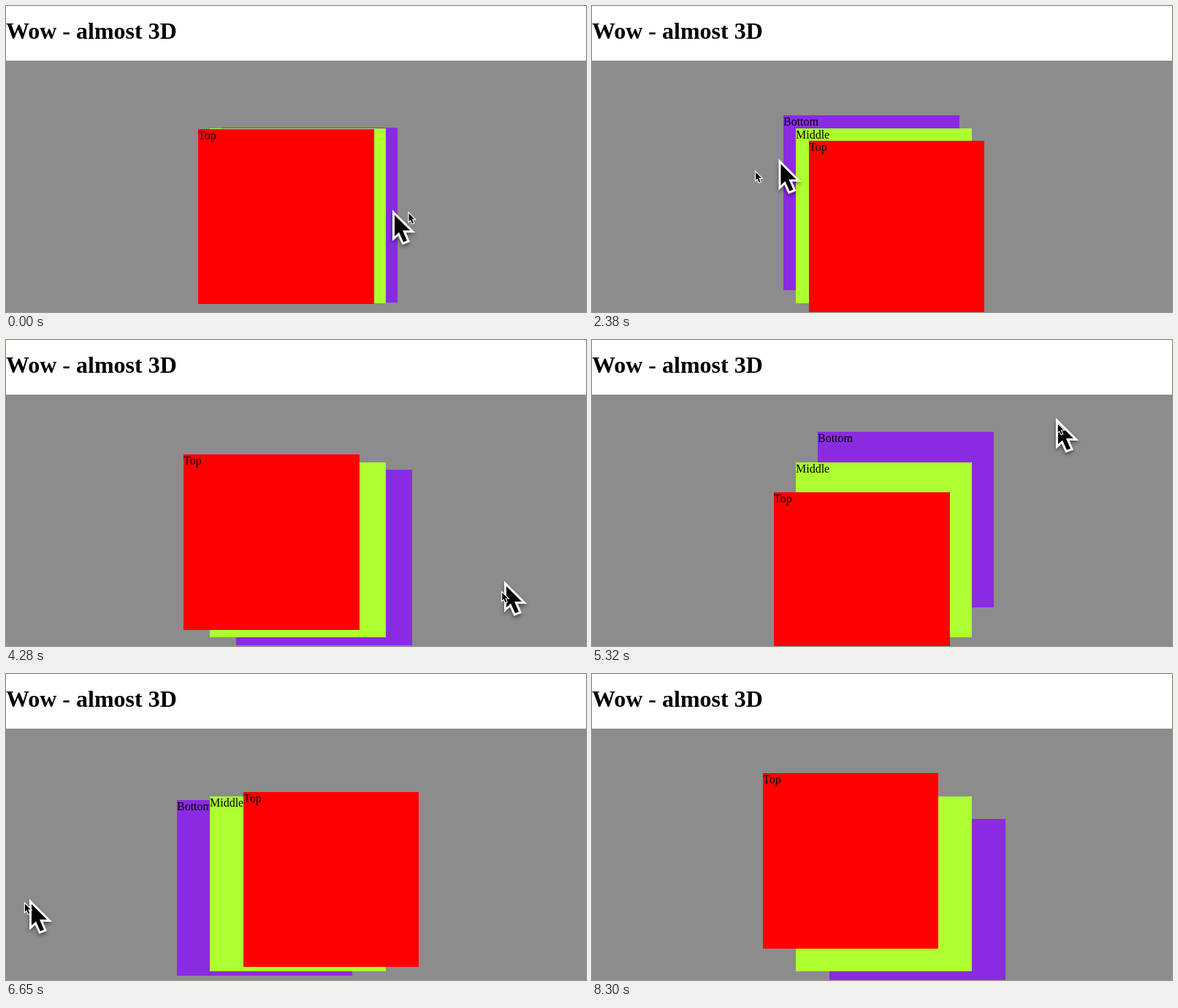
These frames come from a looping animation (794 px wide and 420 px high, 9.26 s). An HTML page with a canvas:

```html
<!DOCTYPE html>
<html lang="en">
<head>
<meta charset="utf-8">
<title>Almost 3D</title>
<style>
html, body { margin: 0; width: 100%; height: 100%; overflow: hidden; background: #fff; }
canvas { display: block; }
</style>
</head>
<body>
<canvas id="stage" width="794" height="420"></canvas>
<script>
const ctx = document.getElementById('stage').getContext('2d');
const LOOP = 9260;
const TICK = 147.5;
const LAST = 56;
const SIZE = 240.4;
const SERIF = '"Liberation Serif", serif';

// Turning points of the pointer: tick, x, y, and ticks to rest there
const turns = [
  [-1, 430, 288], [0, 530, 281], [1.9, 627, 274, 1.5], [6, 713, 310],
  [9, 607, 246], [11.9, 440, 146, 1.5], [19, 29, 304], [21, 212, 314],
  [22, 374, 317], [25.9, 692, 308, 1.5], [29, 683, 332], [31, 640, 410],
  [36, 636, 108], [40, 700, 285], [43, 652, 315], [45, 33, 310],
  [47, 4, 314], [51.9, 762, 302, 1.5], [LAST, 762, 421]
];
const path = turns.flatMap(([k, x, y, rest]) =>
  rest ? [[k, x, y], [k + rest, x, y]] : [[k, x, y]]);

const slope = (i, c) => (path[i + 1][c] - path[i][c]) / (path[i + 1][0] - path[i][0]);

// Monotone tangent, so the pointer never overshoots a turn or a rest
function tangent(i, c) {
  if (i === 0) return slope(0, c);
  if (i === path.length - 1) return 0;
  const a = slope(i - 1, c), b = slope(i, c);
  return a * b > 0 ? 2 * a * b / (a + b) : 0;
}

function pointer(tick) {
  const t = Math.min(tick, LAST);
  let i = 0;
  while (t > path[i + 1][0]) i++;
  const from = path[i], to = path[i + 1];
  const h = to[0] - from[0], u = (t - from[0]) / h, v = 1 - u;
  return [1, 2].map(c =>
    from[c] * v * v * (1 + 2 * u) + to[c] * u * u * (3 - 2 * u) +
    h * u * v * (v * tangent(i, c) - u * tangent(i + 1, c)));
}

function text(str, x, y, font) {
  ctx.fillStyle = '#000';
  ctx.font = font + ' ' + SERIF;
  ctx.fillText(str, x, y);
}

// Edges snap to whole pixels
function square(label, color, dx, dy) {
  const x = 279.4 + dx, y = 167.7 + dy;
  const left = Math.round(x), top = Math.round(y);
  ctx.fillStyle = color;
  ctx.fillRect(left, top, Math.round(x + SIZE) - left, Math.round(y + SIZE) - top);
  text(label, left, top + 14, '16px');
}

const arrow = [[2, 6], [2, 35], [8, 29.5], [14, 43], [19, 41], [13, 27], [23, 27]];

function cursor(x, y, scale, shadow) {
  ctx.save();
  ctx.translate(x, y);
  ctx.scale(scale, scale);
  ctx.beginPath();
  arrow.forEach(p => ctx.lineTo(p[0], p[1]));
  ctx.closePath();
  ctx.lineWidth = 6;
  ctx.strokeStyle = '#fff';
  if (shadow) {
    ctx.shadowColor = 'rgba(0,0,0,0.45)';
    ctx.shadowBlur = 5;
    ctx.shadowOffsetY = 3;
  }
  ctx.stroke();
  ctx.shadowColor = 'transparent';
  ctx.fillStyle = '#000';
  ctx.fill();
  ctx.restore();
}

function draw(ms) {
  const tick = Math.min(LAST, Math.floor(ms / TICK));
  ctx.fillStyle = '#fff';
  ctx.fillRect(0, 0, 794, 75);
  ctx.fillStyle = '#8c8c8c';
  ctx.fillRect(0, 75, 794, 345);
  text('Wow - almost 3D', 0, 45, 'bold 32px');

  // Layers trail the pointer slightly
  const [mx, my] = pointer(tick - 0.05);
  const dx = (398 - mx) / 7.95, dy = (285.5 - my) / 4.3;
  square('Bottom', '#8a2be2', -dx, -dy);
  square('Middle', '#adff2f', 0, 0);
  square('Top', '#ff0000', dx, dy);

  if (tick < LAST) {
    const [bx, by] = pointer(tick);
    const [sx, sy] = pointer(tick + 0.3);
    cursor(bx, by, 1, true);
    cursor(sx, sy + 3, 0.37, false);
  }
}

const start = performance.now();
function loop() {
  draw((performance.now() - start) % LOOP);
  requestAnimationFrame(loop);
}
loop();
</script>
</body>
</html>
```
